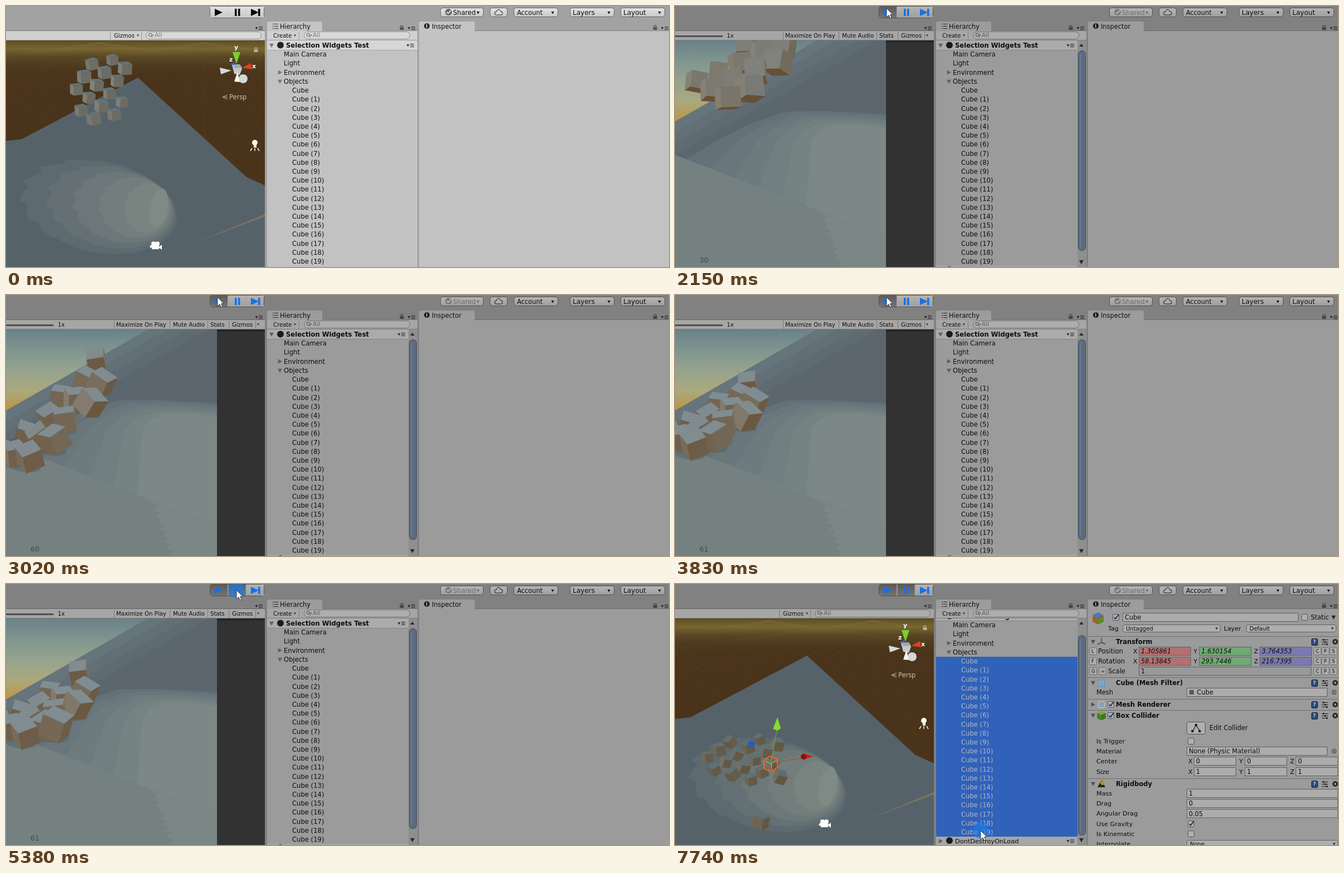
Write an HTML page with a canvas that moves like this. It is 1191 by 470 pixels and loops after 7.99 s.

```html
<!DOCTYPE html>
<html lang="en">
<head>
<meta charset="utf-8">
<title>Editor play mode</title>
<style>
html, body { margin: 0; width: 1191px; height: 470px; overflow: hidden; background: #a2a2a2; }
canvas { display: block; }
</style>
</head>
<body>
<canvas id="stage" width="1191" height="470"></canvas>
<script>
const g = document.getElementById('stage').getContext('2d');
const LOOP = 7990, W = 1191, H = 470;
const FONT = '"DejaVu Sans", sans-serif';
const BLUE = '#1670e6', INK = '#111', PICK = '#3d7be8';
const PRESS = 1620, PLAY = 2120, PAUSE = 5380, SCENE_BACK = 5630, PICK_ONE = 6850, INSPECT = 7100, PICK_ALL = 7740;

// ---------- helpers ----------
const lerp = (a, b, u) => a + (b - a) * u;
const clamp = u => Math.max(0, Math.min(1, u));
const smooth = u => u * u * (3 - 2 * u);
const frac = v => v - Math.floor(v);
const noise = n => frac(Math.sin(n * 127.1) * 43758.5453);
const golden = i => frac(i * .618);
const mix = (a, b, u) => `rgb(${a.map((v, i) => Math.round(lerp(v, b[i], u)))})`;

function rect(x, y, w, h, fill) { g.fillStyle = fill; g.fillRect(x, y, w, h); }

function rounded(x, y, w, h, r, fill, edge) {
  g.beginPath();
  g.roundRect(x + .5, y + .5, w - 1, h - 1, r);
  g.fillStyle = fill;
  g.fill();
  if (edge) { g.strokeStyle = edge; g.lineWidth = 1; g.stroke(); }
}

// y is the middle of the capital letters
function text(s, x, y, size = 11.6, color = INK, style = '') {
  g.font = `${style} ${size}px ${FONT}`;
  g.fillStyle = color;
  g.fillText(s, x, y + size * .365);
}

function poly(p, fill) {
  g.beginPath();
  for (let i = 0; i < p.length; i += 2) g.lineTo(p[i], p[i + 1]);
  g.closePath();
  g.fillStyle = fill;
  g.fill();
}

function line(x0, y0, x1, y1, color, w = 1) {
  g.beginPath();
  g.moveTo(x0, y0);
  g.lineTo(x1, y1);
  g.strokeStyle = color;
  g.lineWidth = w;
  g.stroke();
}

function disc(x, y, r, fill) {
  g.beginPath();
  g.arc(x, y, r, 0, 7);
  g.fillStyle = fill;
  g.fill();
}

function fade(y0, y1, ...colors) {
  const f = g.createLinearGradient(0, y0, 0, y1);
  colors.forEach((c, i) => f.addColorStop(i / (colors.length - 1), c));
  return f;
}

// Points of a saw-toothed edge
function jag(x0, y0, x1, y1, n, d) {
  const out = [];
  for (let i = 0; i <= n; i++) {
    const x = lerp(x0, x1, i / n), y = lerp(y0, y1, i / n);
    out.push(x, y, x - d, y + d * 1.2);
  }
  return out;
}

function arrow(x, y, r, open = true, color = '#555') {
  poly(open ? [x - r, y - r * .8, x + r, y - r * .8, x, y + r] : [x - r * .8, y - r, x + r, y, x - r * .8, y + r], color);
}

function clipped(x, y, w, h, draw) {
  g.save();
  g.beginPath();
  g.rect(x, y, w, h);
  g.clip();
  draw();
  g.restore();
}

// ---------- cubes ----------
const GAME = { front: [124, 116, 102], top: [128, 141, 146], under: [102, 80, 54] };
const FLOAT = { front: [116, 121, 115], top: [99, 115, 119], under: [100, 90, 72] };
const PILE = { front: [106, 101, 86], top: [97, 112, 115], under: [96, 82, 60] };

function cube(x, y, s, roll, pitch, yaw, pal) {
  const [r, p, w] = [roll, pitch, yaw].map(a => a * Math.PI / 180);
  const turn = (a, b, c) => {
    const x1 = a * Math.cos(w) + c * Math.sin(w), z1 = c * Math.cos(w) - a * Math.sin(w);
    const y2 = b * Math.cos(p) + z1 * Math.sin(p), z2 = z1 * Math.cos(p) - b * Math.sin(p);
    return [x1 * Math.cos(r) - y2 * Math.sin(r), x1 * Math.sin(r) + y2 * Math.cos(r), z2];
  };
  const axes = [turn(1, 0, 0), turn(0, 1, 0), turn(0, 0, 1)], h = s / 2;
  axes.forEach((axis, i) => {
    const k = axis[2] > 0 ? 1 : -1, n = axis.map(v => v * k);
    if (n[2] < .02) return;
    const u = axes[(i + 1) % 3], v = axes[(i + 2) % 3], pts = [];
    for (const [a, b] of [[1, 1], [1, -1], [-1, -1], [-1, 1]])
      pts.push(x + h * (n[0] + a * u[0] + b * v[0]), y + h * (n[1] + a * u[1] + b * v[1]));
    const to = n[1] < 0 ? pal.top : pal.under;
    poly(pts, mix(pal.front.map(c => c - n[0] * 12), to, Math.min(1, Math.abs(n[1]) * 1.2)));
  });
}

// The cubes lie scattered along a slanted line that drops, hits the slope and settles
const stages = [
  { t: 2120, top: [200, 54], foot: [60, 164], spread: 76, spin: .35 },
  { t: 2570, top: [200, 100], foot: [58, 210], spread: 76, spin: .8, ease: u => u * u },
  { t: 3020, top: [180, 140], foot: [5, 302], spread: 58, spin: 1.15, ease: u => u },
  { t: 3830, top: [148, 182], foot: [2, 268], spread: 56, spin: 1, ease: u => u * (2 - u) }];
const COUNT = 14, SLIDER = 2;

function gameCubes(t) {
  const i = t < stages[1].t ? 1 : t < stages[2].t ? 2 : 3, from = stages[i - 1], to = stages[i];
  const u = to.ease(clamp((t - from.t) / (to.t - from.t)));
  const slide = smooth(clamp((t - 3830) / 1470));
  const spot = (s, a, v) => [0, 1].map(j => lerp(s.top[j], s.foot[j], a) + (v - .5) * s.spread * (j ? .8 : .6));
  const spin = lerp(from.spin, to.spin, u), list = [];
  for (let n = 0; n < COUNT; n++) {
    const a = n / (COUNT - 1), v = golden(n), p = spot(from, a, v), q = spot(to, a, v);
    const s = n === SLIDER ? slide : 0;
    list.push([lerp(p[0], q[0], u) - s * 27, lerp(p[1], q[1], u) + s * 70, 31 + v * 8 + s * 10,
      (noise(n + 1) - .5) * 70 * spin, lerp(-25, 18, clamp(spin * 2 - 1)) + noise(n + 4) * 20, (noise(n + 7) - .5) * 70]);
  }
  return list.sort((a, b) => a[1] + a[2] - b[1] - b[2]);
}

// ---------- game view ----------
function gameView(t) {
  rect(0, 62, 465, 408, '#323232');
  rect(379, 62, 86, 4, '#262626');
  clipped(0, 62, 379, 408, () => {
    rect(0, 62, 379, 150, fade(62, 210, '#6a8189', '#7f958f', '#96a38f', '#aaa97c', '#bd9340'));
    for (let k = 0; k < 4; k++)
      poly([255 + k * 36, 62, 379, 62, 379, 470, 0, 470, 0, 208 + k * 20], mix([102, 116, 124], [91, 102, 110], k / 3));
    // Shoulders of the hill, each lighter than the one behind
    for (let k = 0; k <= 1; k += .2) {
      const x = lerp(20, 238, k), y = 268 + x * .39, neck = x + lerp(70, 8, k), high = lerp(190, 215, k);
      const teeth = jag(x, y, neck, lerp(232, 244, k), 5, 4);
      poly([...teeth, lerp(130, 256, k), lerp(214, 226, k), lerp(200, 285, k), high, lerp(270, 340, k), high - 1,
        379, high + 5, 379, 418, 250, 366], mix([100, 113, 120], [123, 136, 134], k));
    }
    poly([0, 268, 250, 365, 379, 418, 379, 470, 0, 470], '#748180');
    poly([252, 368, ...jag(272, 380, 304, 470, 8, 8), 379, 470, 379, 418], '#7b8785');
    const cubes = gameCubes(t);
    for (const [x, y, s] of cubes) if (y > 195) {
      g.beginPath();
      g.ellipse(x - 8, y + s * .5, s * .75, s * .25, .1, 0, 7);
      g.fillStyle = 'rgba(75,88,96,.4)';
      g.fill();
    }
    cubes.forEach(c => cube(...c, GAME));
    const fps = t < 2900 ? 30 : t < 3750 ? 60 : t < 4530 ? 61 : t < 5250 ? 60 : 61;
    text(fps, 44, 457, 12.5, '#3e4b4b');
  });
}

// ---------- scene view ----------
function scatter(n, x, y, w, h, size, tilt, pal) {
  for (let i = 0; i < n; i++)
    cube(x + w * frac(golden(i) + .7), y + h * i / (n - 1), size + noise(i) * 4,
      (noise(i + 9) - .5) * tilt, 14 + noise(i + 3) * tilt * .3, 20 + noise(i + 5) * 12, pal);
}

// Nested shells of the hill, ragged on the left, closing in on the bright side
function hill() {
  for (let k = 0; k <= 1; k += .2) {
    const cx = lerp(165, 274, k), cy = lerp(361, 364, k), rx = lerp(144, 16, k), ry = lerp(82, 36, k), pts = [];
    for (let i = 0; i < 90; i++) {
      const a = i / 90 * Math.PI * 2, left = Math.max(0, -Math.cos(a));
      const r = 1 - left * .12 * frac(i / 6 + k), x = rx * r * Math.cos(a), y = ry * r * Math.sin(a), tilt = .2;
      pts.push(cx + x * Math.cos(tilt) - y * Math.sin(tilt), cy + x * Math.sin(tilt) + y * Math.cos(tilt));
    }
    poly(pts, mix([93, 106, 111], [128, 138, 133], k));
  }
}

function handles() {
  line(172, 323, 137, 288, 'rgba(60,100,210,.4)');
  line(172, 323, 184, 258, '#6fae3c');
  line(172, 323, 232, 312, '#b8472c');
  poly([184, 240, 190, 260, 184, 264, 176, 261], '#86dc2a');
  poly([248, 310, 230, 305, 230, 317], '#c3200f');
  disc(231, 311, 5, '#841509');
  disc(137, 288, 6, '#2459c6');
  g.beginPath();
  for (let a = .4; a < 6.6; a += Math.PI / 3) g.lineTo(172 + 14 * Math.cos(a), 324 + 14 * Math.sin(a));
  g.closePath();
  g.strokeStyle = '#f0641a';
  g.lineWidth = 2.5;
  g.stroke();
  for (let a = -.6; a < 5; a += Math.PI * 2 / 3) line(173, 324, 173 + 11 * Math.cos(a), 324 + 11 * Math.sin(a), '#9ade62');
}

function sceneIcons() {
  disc(447, 246, 5, '#fbfaee');
  rect(445, 249, 5, 6, '#f2efdc');
  for (let i = -1; i <= 1; i++) line(447 + i * 5, 256, 447 + i * 8, 261, '#f2efdc', 1.5);
  disc(265, 428, 4, '#fff');
  disc(272, 428, 4, '#fff');
  rect(262, 430, 13, 8, '#fff');
  poly([274, 434, 280, 430, 280, 439], '#fff');
  disc(261, 433, 2.5, '#fff');

  poly([407, 83, 421, 83, 414, 104], '#7bd02f');
  poly([404, 104, 413, 101, 410, 111], '#2a62e0');
  poly([424, 111, 440, 103, 442, 114], '#e33f1b');
  poly([384, 111, 386, 123, 405, 116], '#d6d8d8');
  poly([406, 106, 420, 105, 424, 113, 420, 124, 410, 122], '#c3c8c9');
  poly([407, 106, 420, 105, 424, 111, 411, 112], '#9ea9ad');
  disc(426, 131, 8, '#d3d8d5');
  poly([410, 136, 416, 118, 420, 137], '#f4f4f2');
  text('y', 410, 74, 11, '#fff', 'bold');
  text('z', 401, 96, 11, '#fff', 'bold');
  text('x', 442, 108, 11, '#fff', 'bold');
  for (let i = -1; i <= 1; i++) line(389, 164, 398, 164 + i * 4, '#bcb6ac');
  text('Persp', 401, 164, 11.4, '#c9c3b8');
  lock(449, 79, '#b5afa0');
}

function sceneView(settled, picked) {
  clipped(0, 62, 465, 408, () => {
    rect(0, 62, 465, 408, '#49331a');
    rect(0, 62, 465, 60, fade(62, 122, '#5d4d23', '#78652f', '#574522', '#4c391d', '#49331a'));
    for (let k = -20; k <= 20; k++)
      for (const x of [356, 168]) line(x, 66, x + k * 150, 470, 'rgba(150,125,90,.08)');
    poly([237, 129, 432, 308, 465, 323, 465, 470, 0, 470, 0, 243, 28, 240], '#56626a');
    hill();
    poly([345, 424, 465, 375, 465, 379], '#81735b');
    if (settled) {
      scatter(17, 55, 280, 138, 72, 15, 70, PILE);
      cube(154, 428, 22, 10, 20, -30, PILE);
    } else scatter(15, 124, 97, 96, 106, 16, 16, FLOAT);
    if (picked) handles();
    sceneIcons();
  });
}

// ---------- chrome ----------
function lock(x, y, color) {
  g.strokeStyle = color;
  g.lineWidth = 1.3;
  g.beginPath();
  g.arc(x, y - 1.5, 2.3, Math.PI, 0);
  g.stroke();
  rect(x - 3.5, y - 1, 7, 5, color);
}

function menu(x, y) {
  arrow(x - 4, y, 2.4, true, '#333');
  for (let i = -1; i <= 1; i++) rect(x, y + i * 2.5 - .5, 7, 1, '#333');
}

function search(x, w) {
  rounded(x, 46, w, 14, 7, '#d9d9d9', '#8c8c8c');
  g.strokeStyle = '#777';
  g.lineWidth = 1.2;
  g.beginPath();
  g.arc(x + 8, 52, 2.7, 0, 7);
  g.moveTo(x + 10, 54);
  g.lineTo(x + 12, 57);
  g.stroke();
  arrow(x + 13, 53, 1.8, true, '#777');
  text('All', x + 16, 52.5, 10.8, '#777');
}

function drop(x, w, label, tx, size, color = INK) {
  rounded(x, 3, w, 17, 4, fade(3, 20, '#e4e4e4', '#c6c6c6'), '#666');
  if (!label) return;
  text(label, tx, 11.5, size, color);
  arrow(x + w - 10, 12, 2.6, true, color);
}

function transport(t) {
  const down = [t >= PRESS, t >= PAUSE, false];
  rounded(366, 0, 98, 22, 4, '#cdcdcd', '#666');
  down.forEach((d, i) => rect(367 + i * 32.5, 1, 31, 20, d ? fade(1, 21, '#737373', '#909090') : fade(1, 21, '#e2e2e2', '#c8c8c8')));
}

function transportIcons(ink) {
  for (const x of [375, 440]) poly([x, 5, x + 14, 11.5, x, 18], ink);
  for (const x of [411, 417, 453]) rect(x, 5, 3.5, 13, ink);
}

function cloud(grow, color) {
  disc(881, 13, 2.5 + grow, color);
  disc(885, 10.5, 3.4 + grow, color);
  disc(889, 13, 2.5 + grow, color);
  rect(881, 11, 8, 4.5 + grow, color);
}

function toolbar(t) {
  const on = t >= PLAY;
  transport(t);
  drop(780, 78, 'Shared', 803, 11.6, on ? '#888' : INK);
  disc(795, 11, 6, on ? '#999' : '#666');
  line(792, 11, 794.5, 13.5, '#eee', 1.8);
  line(794.5, 13.5, 799, 8, '#eee', 1.8);
  drop(869, 32);
  cloud(1, '#222');
  cloud(0, '#d8d8d8');
  drop(912, 80, 'Account', 918, 11.4);
  drop(1013, 80, 'Layers', 1018, 12);
  drop(1104, 80, 'Layout', 1109, 12);
}

function panel(x, w, tabW, label, tx) {
  rect(x, 45, w, 425, '#c2c2c2');
  g.beginPath();
  g.roundRect(x, 28, tabW, 18, [3, 3, 0, 0]);
  g.fillStyle = '#c4c4c4';
  g.fill();
  rect(x + tabW, 44, w - tabW, 1, '#858585');
  text(label, tx, 36.5, 11.4);
}

function leftBar(game) {
  rect(0, 44, 465, 1, '#7a7a7a');
  rect(0, 45, 465, 17, '#d0d0d0');
  rect(0, 61, 465, 1, '#9a9a9a');
  (game ? [194, 294, 362, 400, 448] : [187, 243]).forEach(x => rect(x, 46, 1, 15, '#989898'));
  if (game) {
    rounded(-5, 53, 91, 3, 1, '#777', '#555');
    [['1x', 93], ['Maximize On Play', 198], ['Mute Audio', 300], ['Stats', 367], ['Gizmos', 406]]
      .forEach(([s, x]) => text(s, x, 53.5, 10.1));
    arrow(453, 53, 2.2);
  } else {
    text('Gizmos', 194, 53.5, 10);
    arrow(237, 53, 2.2);
    search(251, 208);
  }
}

// ---------- hierarchy ----------
function hierarchy(t) {
  const on = t >= PLAY, all = t >= PICK_ALL, right = on ? 723 : 739, w = right - 469;
  panel(469, 270, 99, 'Hierarchy', 492);
  for (let i = 0; i < 3; i++) { rect(479, 32 + i * 4, 2, 1, '#333'); rect(482, 32 + i * 4, 7, 1, '#333'); }
  rect(469, 45, 270, 17, '#d0d0d0');
  rect(469, 61, 270, 1, '#9a9a9a');
  text('Create', 480, 53.5, 10.1);
  arrow(519, 53, 2.2);
  rect(526, 46, 1, 15, '#a0a0a0');
  search(535, 191);
  clipped(469, 62, 270, 408, () => {
    g.save();
    g.translate(0, all ? -13 : 0);
    rect(469, 62, w, 17, '#d6d6d6');
    rect(469, 79, w, 1, '#a6a6a6');
    arrow(477, 71, 4, true, '#777');
    disc(493, 70.5, 6, '#222');
    text('Selection Widgets Test', 503, 71, 11.6, INK, 'bold');
    menu(right - 13, 71);
    if (t >= PICK_ONE) rect(469, 144, w, all ? 324 : 16, PICK);
    ['Main Camera', 'Light', 'Environment', 'Objects'].forEach((s, i) => text(s, 499, 87 + i * 16.2));
    arrow(492, 119.5, 4, false, '#777');
    arrow(492, 136, 4, true, '#777');
    for (let i = 0; i < 20; i++)
      text(i ? `Cube (${i})` : 'Cube', 514, 152 + i * 16.2, 11.6, all || (!i && t >= PICK_ONE) ? '#dde6fa' : INK);
    if (on) {
      rect(469, 468, w, 18, '#d0d0d0');
      arrow(477, 476, 4, false, '#777');
      disc(493, 475, 6, '#222');
      text('DontDestroyOnLoad', 503, 476, 11.3);
      menu(710, 476);
    }
    g.restore();
    if (!on) return;
    const thumb = all ? 92 : 80;
    rect(723, 62, 16, 408, '#b4b4b4');
    rounded(724, thumb, 14, 361, 6, '#73869f', '#4d5d75');
    rect(727, thumb + 6, 3, 349, '#8295ae');
    poly([726, 73, 734, 73, 730, 68], '#333');
    arrow(730, 461, 4, true, '#333');
  });
}

// ---------- inspector ----------
function field(x, y, w, s = '', fill = '#d8d8d8', style = '') {
  rect(x, y - 8, w, 16, '#777');
  rect(x + 1, y - 7, w - 2, 14, fill);
  text(s, x + 4, y, 11.4, INK, style);
}

function check(x, y, on) {
  rounded(x - 6, y - 6, 12, 12, 2, '#dcdcdc', '#666');
  if (!on) return;
  line(x - 3, y, x - 1, y + 3, '#173d78', 2);
  line(x - 1, y + 3, x + 5, y - 5, '#173d78', 2);
}

function popup(x, y, w, s) {
  rounded(x, y - 7, w, 14, 3, '#dadada', '#777');
  text(s, x + 6, y, 10);
  arrow(x + w - 7, y, 2.3, true, '#333');
}

function mini(x, y, s) {
  rounded(x - 7, y - 7, 14, 14, 2, '#d8d8d8', '#888');
  text(s, x - 3, y, 8.6);
}

function header(y, label, open, box) {
  rect(742, y - 10, 449, 1, '#8a8a8a');
  arrow(751, y, 4, open, '#666');
  if (box) check(783, y, true);
  text(label, 792, y, 11.5, INK, 'bold');
  rounded(1143, y - 6, 12, 13, 2, '#345b92', '#1e3354');
  text('?', 1146, y, 9, '#fff', 'bold');
  for (let i = -1; i <= 1; i++) { rect(1162, y + i * 4, 11, 1, '#222'); rect(1167 + i * 3, y + i * 4 - 1, 2, 3, '#222'); }
  disc(1186, y, 5, '#333');
  disc(1186, y, 2, '#c2c2c2');
}

function triple(y, x0, step, w, values, fills = [], style) {
  values.forEach((v, i) => {
    text('XYZ'[i], x0 + i * step - 10, y, 11);
    field(x0 + i * step, y, w, v, fills[i], style);
  });
}

function details() {
  cube(760, 62, 14, 0, 28, 40, { front: [222, 84, 52], top: [92, 150, 230], under: [120, 180, 60] });
  poly([760, 63, 770, 58, 769, 68, 760, 73], '#6fae3a');
  check(792, 60, true);
  field(804, 60, 316, 'Cube');
  check(1131, 60, false);
  text('Static', 1142, 60, 11.5);
  arrow(1183, 60, 4, true, '#333');
  text('Tag', 778, 80, 11);
  popup(804, 80, 176, 'Untagged');
  text('Layer', 986, 80, 11);
  popup(1026, 80, 162, 'Default');

  header(104, 'Transform', true);
  line(766, 105, 766, 97, '#5aa02c', 2);
  line(766, 105, 773, 108, '#d43a2a', 2);
  line(766, 105, 759, 109, '#3c6fd6', 2);
  const tints = ['#e28c8c', '#8ed490', '#9a98dc'];
  triple(121, 833, 108.5, 94, ['1.305861', '1.630154', '3.764353'], tints, 'italic');
  triple(139, 833, 108.5, 94, ['58.13845', '293.7446', '216.7395'], tints, 'italic');
  field(833, 157, 310, '1', '#c0c0c0');
  ['Position', 'Rotation', 'Scale'].forEach((s, i) => {
    const y = 121 + i * 18;
    mini(751, y, 'LFG'[i]);
    text(s, i === 2 ? 778 : 760, y, 11.5);
    [...'CPS'].forEach((b, j) => mini(1154 + j * 14.5, y, b));
  });
  mini(768, 157, '=');

  header(178, 'Cube (Mesh Filter)', true);
  rect(759, 172, 13, 13, '#6aa7d6');
  for (let i = 1; i < 4; i++) { rect(758 + i * 3.5, 172, 1, 13, '#e5f2fb'); rect(759, 171 + i * 3.5, 13, 1, '#e5f2fb'); }
  text('Mesh', 757, 195, 11.4);
  field(919, 195, 253, '    Cube');
  rect(924, 191, 8, 8, '#5c7286');

  header(217, 'Mesh Renderer', false, true);
  rounded(760, 211, 12, 12, 2, '#a4cbe6', '#fff');
  header(237, 'Box Collider', true, true);
  cube(766, 237, 11, 0, 28, 42, { front: [100, 170, 40], top: [150, 215, 80], under: [70, 120, 30] });
  rounded(919, 248, 34, 23, 3, '#dcdcdc', '#666');
  line(930, 265, 936, 254, '#222', 1.3);
  line(936, 254, 943, 265, '#222', 1.3);
  for (let i = -1; i <= 1; i++) rect(934 + i * 6.5, i ? 263 : 252, 4, 4, '#222');
  text('Edit Collider', 960, 259, 11.4);
  ['Is Trigger', 'Material', 'Center', 'Size'].forEach((s, i) => text(s, 757, 283 + i * 18.2, 11.2));
  check(927, 283, false);
  field(919, 301, 253, 'None (Physic Material)');
  triple(319, 932, 91.5, 76, ['0', '0', '0']);
  triple(338, 932, 91.5, 76, ['1', '1', '1']);
  for (const y of [195, 301]) {
    disc(1184, y, 4, '#444');
    disc(1184, y, 3, '#c2c2c2');
    disc(1184, y, 1.2, '#444');
  }

  header(360, 'Rigidbody', true);
  poly([766, 353, 773, 366, 759, 366], '#2b2b2b');
  disc(768, 358, 4, '#e0b62d');
  ['Mass', 'Drag', 'Angular Drag', 'Use Gravity', 'Is Kinematic', 'Interpolate'].forEach((s, i) => text(s, 757, 377 + i * 18.2, 11.2));
  ['1', '0', '0.05'].forEach((s, i) => field(919, 377 + i * 18.2, 272, s));
  check(927, 432, true);
  check(927, 450, false);
  popup(919, 468, 272, 'None');
}

function inspector(t) {
  panel(742, 449, 100, 'Inspector', 765);
  disc(756, 36, 5, '#222');
  text('i', 754.3, 36, 8.5, '#fff', 'bold');
  if (t >= INSPECT) details();
}

// ---------- pointer ----------
// Each move: start, end, target
const moves = [[500, 1290, 375, 13], [1360, 1370, 380, 4], [4570, 5380, 414, 11], [6130, 6850, 543, 147], [7100, 7740, 549, 444]];
const clicks = [[1520, PRESS], [PAUSE, SCENE_BACK], [PICK_ONE, INSPECT], [PICK_ALL, LOOP]];

function pointer(t) {
  if (t < 500) return;
  let x = 299, y = 411;
  for (const [a, b, tx, ty] of moves) {
    const u = smooth(clamp((t - a) / (b - a)));
    x = lerp(x, tx, u);
    y = lerp(y, ty, u);
  }
  if (clicks.some(([a, b]) => t >= a && t < b)) disc(x + .5, y, 15, 'rgba(20,125,240,.55)');
  g.save();
  g.translate(x, y);
  poly([0, 0, 0, 16, 4, 12.5, 6.5, 18, 9, 17, 6.5, 11.5, 11, 11.5], '#fff');
  g.strokeStyle = '#222';
  g.lineWidth = .8;
  g.stroke();
  g.restore();
}

function draw(t) {
  const on = t >= PLAY, game = on && t < SCENE_BACK;
  rect(0, 0, W, H, '#a2a2a2');
  toolbar(t);
  leftBar(game);
  hierarchy(t);
  inspector(t);
  [454, 728, 1183].forEach(x => menu(x, 40));
  [711, 1166].forEach(x => lock(x, 39, '#555'));
  // Play mode darkens the whole editor, but not the views
  if (on) rect(0, 0, W, H, 'rgba(0,0,0,.205)');
  transportIcons(on ? BLUE : '#080808');
  if (game) gameView(t);
  else sceneView(on, t >= INSPECT);
  pointer(t);
}

const t0 = performance.now();
function tick() {
  draw((performance.now() - t0) % LOOP);
  requestAnimationFrame(tick);
}
tick();
</script>
</body>
</html>
```
